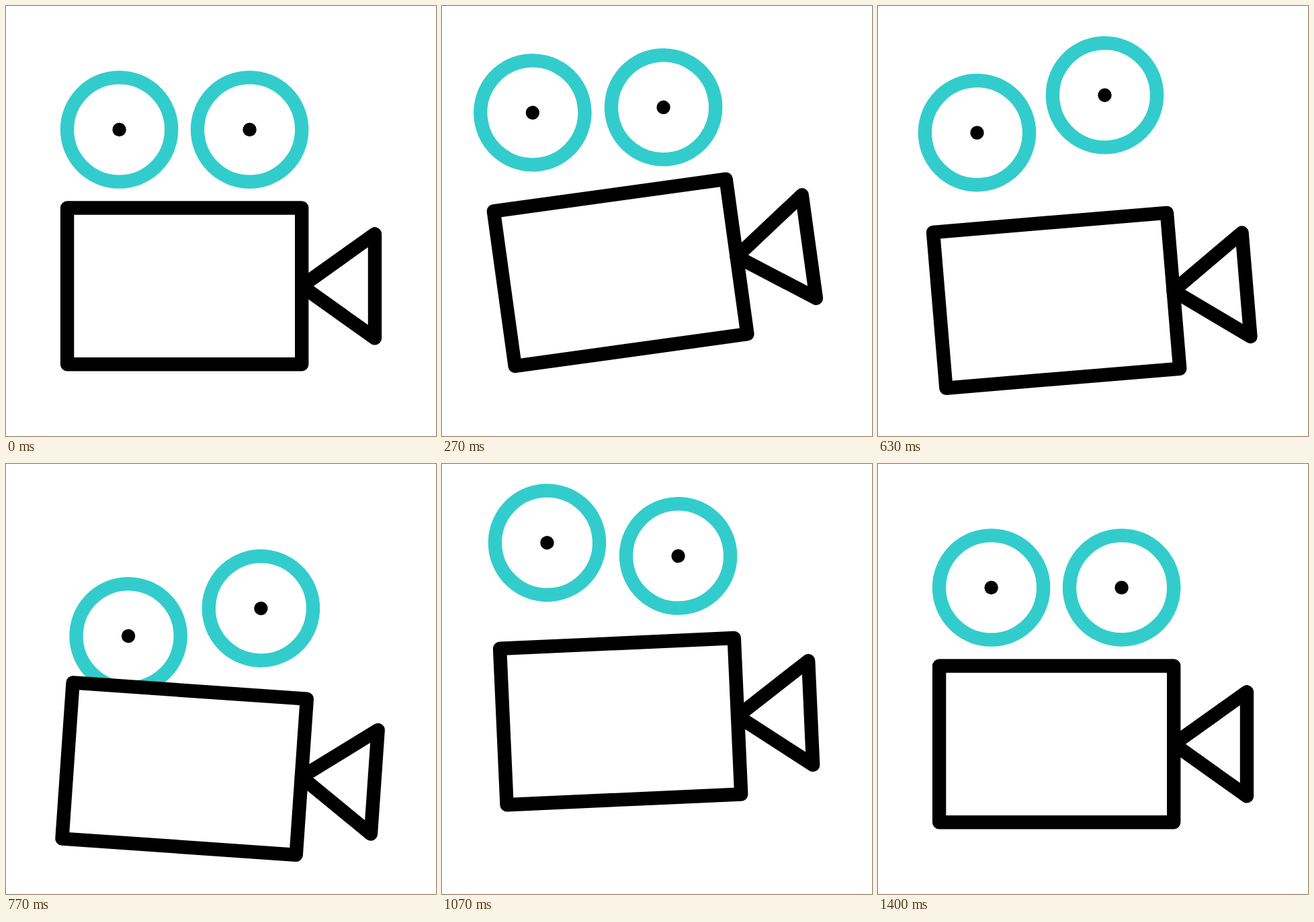
These frames come from a looping animation (640x640 px, 2 s). An HTML page:

```html
<!DOCTYPE html>
<html lang="en">
<head>
<meta charset="utf-8">
<title>Film camera</title>
<style>
  html, body { margin: 0; width: 100%; height: 100%; overflow: hidden; background: #fff; }
  svg { display: block; width: 100%; height: 100%; }
  .line { fill: #fff; stroke: #000; stroke-width: 20.4; stroke-linejoin: round; }
  .open { fill: none; }
  .ring { fill: none; stroke: #3cc; stroke-width: 20.4; }
</style>
</head>
<body>
<svg viewBox="0 0 640 640">
  <defs>
    <g id="reel">
      <circle class="ring" r="77.6"/>
      <circle r="10.2"/>
    </g>
  </defs>
  <g id="camera">
    <use id="left" href="#reel"/>
    <use id="right" href="#reel"/>
    <rect class="line" x="91.1" y="300.5" width="349.1" height="232.7"/>
    <path class="line open" d="M440.2 416.9L549 339.3V494.4Z"/>
  </g>
</svg>
<script>
  const LOOP = 2000;
  const REEL_Y = 184;
  const PIVOT = [265.6, 416.9];

  // Beats, in steps, at which a movement turns round; every movement rests at both ends.
  const BOUNCE = [0, 14, 21.55, 31.5, 38.4];
  const TILT = [0, 14, 24.7, 34.3, 42];

  // The reels bounce a little faster than the body, one after the other.
  const REEL_PACE = 0.925;
  const reels = [
    { node: byId("left"), x: 168.6, delay: 3.15 },
    { node: byId("right"), x: 362.6, delay: 6.6 }
  ];
  const camera = byId("camera");

  function byId(id) {
    return document.getElementById(id);
  }

  function smooth(s) {
    return s * s * (3 - 2 * s);
  }

  // Eases from rest through each peak in turn and back to rest.
  function swing(step, beats, peaks) {
    const i = beats.findIndex(beat => beat > step);
    if (i < 1) return 0;
    const from = peaks[i - 2] || 0, to = peaks[i - 1] || 0;
    const s = (step - beats[i - 1]) / (beats[i] - beats[i - 1]);
    return from + (to - from) * smooth(s);
  }

  // Thirty steps a second, on a 10 ms clock.
  function stepAt(ms) {
    const rest = ms % 100;
    return 3 * Math.floor(ms / 100) + (rest >= 30) + (rest >= 70);
  }

  function draw(ms) {
    const step = stepAt(ms % LOOP);
    const y = swing(step, BOUNCE, [-33, 41.1, -34.2]);
    const angle = swing(step, TILT, [-12.95, 5.2, -3.9]);
    camera.setAttribute("transform", `translate(0 ${y}) rotate(${angle} ${PIVOT})`);

    for (const { node, x, delay } of reels) {
      const hop = swing((step - delay) / REEL_PACE, BOUNCE, [-66, 41.5, -38]);
      node.setAttribute("transform", `translate(${x} ${REEL_Y + hop})`);
    }
  }

  let start = null;
  function tick(now) {
    if (start === null) start = now;
    draw(now - start);
    requestAnimationFrame(tick);
  }
  draw(0);
  requestAnimationFrame(tick);
</script>
</body>
</html>
```
